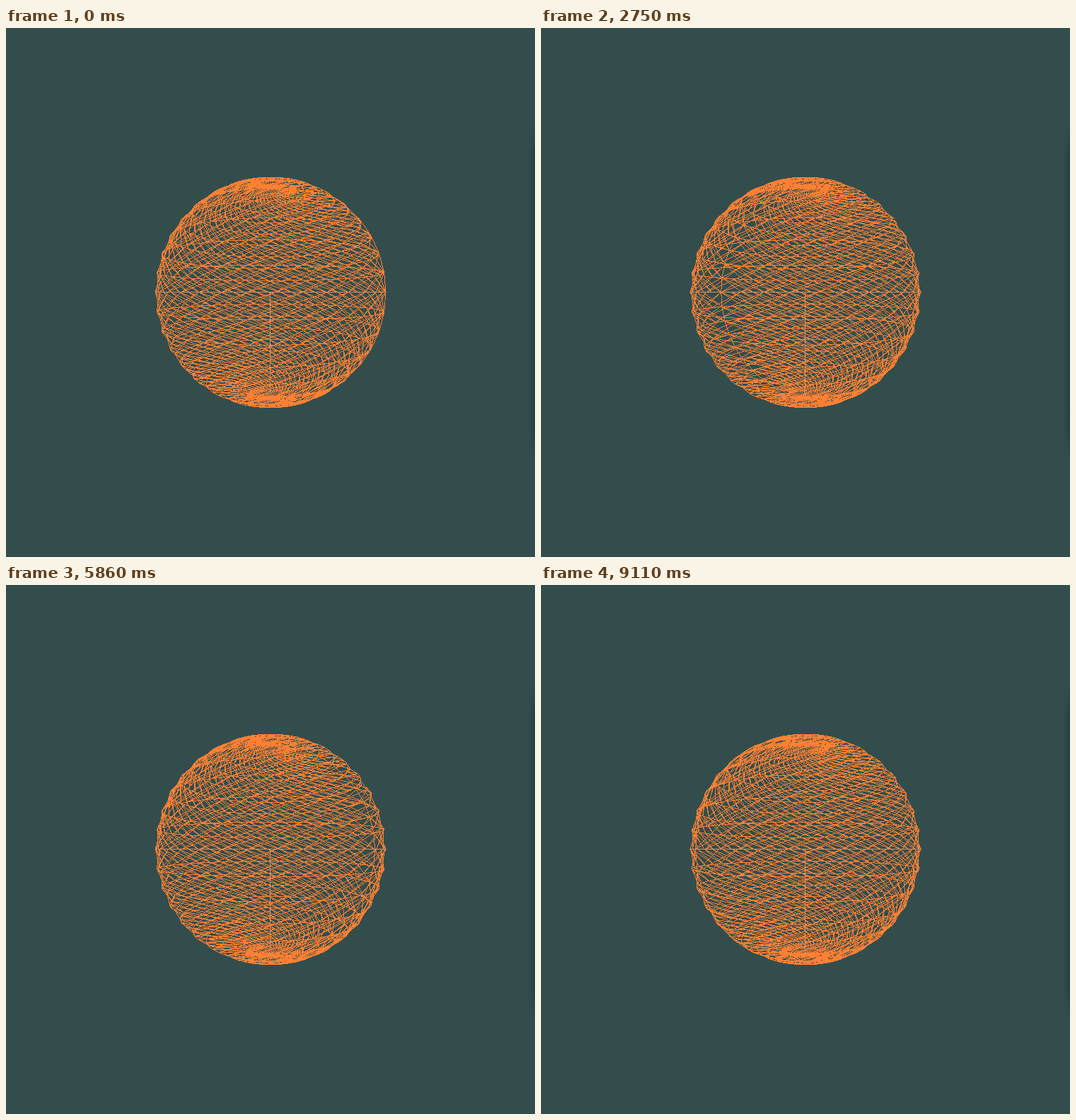
Recreate the animation shown at these times as an HTML page with a canvas. Size 748 by 748 pixels, loop 9.21 s.

```html
<!DOCTYPE html>
<html lang="en">
<head>
<meta charset="utf-8">
<title>Wireframe sphere</title>
<style>
  html, body { margin: 0; width: 100%; height: 100%; overflow: hidden; background: #334d4d; }
  canvas { display: block; width: 748px; height: 748px; }
</style>
</head>
<body>
<canvas id="stage" width="748" height="748"></canvas>
<script>
const SIZE = 748, MID = 373.9, HALF = 374;
const LOOP = 9210, LAST = 9120, STEP = 47.5, LEAD = 10;
const START = 64.4, SPEED = 66.3;        // degrees, degrees per second
const SECTORS = 40, STACKS = 20, CAMERA = 2.5;
const RING = SECTORS + 1;                // points per ring, first and last coincide
const STRIDE = RING - 2;                 // short stride: every facet is skewed
const rgb = (r, g, b) => (255 << 24 | b << 16 | g << 8 | r) >>> 0;
const ORANGE = rgb(255, 128, 51);
const PALE = rgb(216, 148, 102);

const ctx = document.getElementById("stage").getContext("2d");

function paintBackdrop() {
  ctx.fillStyle = "#334d4d";
  ctx.fillRect(0, 0, SIZE, SIZE);
  // faint shade on the right border
  for (let y = 140; y < 610; y++) {
    const fade = Math.min(1, (y - 140) / 40, (610 - y) / 40);
    const shade = ctx.createLinearGradient(738, 0, SIZE, 0);
    shade.addColorStop(0, "rgba(30,50,50,0)");
    shade.addColorStop(1, `rgba(30,50,50,${0.5 * fade})`);
    ctx.fillStyle = shade;
    ctx.fillRect(738, y, 10, 1);
  }
}

paintBackdrop();
const backdrop = new Uint32Array(ctx.getImageData(0, 0, SIZE, SIZE).data.buffer);
const image = ctx.createImageData(SIZE, SIZE);
const pixels = new Uint32Array(image.data.buffer);

// Hard-edged line, one pixel wide
function line(a, b, color) {
  const dx = b.x - a.x, dy = b.y - a.y;
  const n = Math.max(1, Math.round(Math.max(Math.abs(dx), Math.abs(dy))));
  for (let k = 0; k <= n; k++) {
    const x = Math.floor(a.x + dx * k / n);
    const y = Math.floor(a.y + dy * k / n);
    pixels[y * SIZE + x] = color;
  }
}

function project(x, y, z) {
  const scale = HALF / (CAMERA - z);
  return { x: MID + x * scale, y: MID - y * scale };
}

function spherePoints(turn) {
  const points = [];
  for (let i = 0; i <= STACKS; i++) {
    const polar = Math.PI * i / STACKS, radius = Math.sin(polar);
    for (let j = 0; j < RING; j++) {
      const a = turn + 2 * Math.PI * j / SECTORS;
      points.push(project(radius * Math.sin(a), Math.cos(polar), radius * Math.cos(a)));
    }
  }
  return points;
}

function draw(ms) {
  const time = Math.min(LAST, Math.floor((ms + LEAD) / STEP) * STEP);
  const turn = (START + SPEED * time / 1000) * Math.PI / 180;
  const points = spherePoints(turn);
  pixels.set(backdrop);

  for (let v = 0; v + 1 < points.length; v++) {
    line(points[v], points[v + 1], ORANGE);
    const below = points[v + STRIDE];
    if (below) {
      line(points[v], below, ORANGE);
      line(points[v + 1], below, ORANGE);
    }
  }

  const equator = STACKS / 2 * RING;
  for (let j = 0; j < SECTORS; j++) line(points[equator + j], points[equator + j + 1], PALE);
  line(project(0, 0, 0), project(0, -1, 0), PALE);
  ctx.putImageData(image, 0, 0);
}

const begin = performance.now();
function tick() {
  draw((performance.now() - begin) % LOOP);
  requestAnimationFrame(tick);
}
tick();
</script>
</body>
</html>
```
